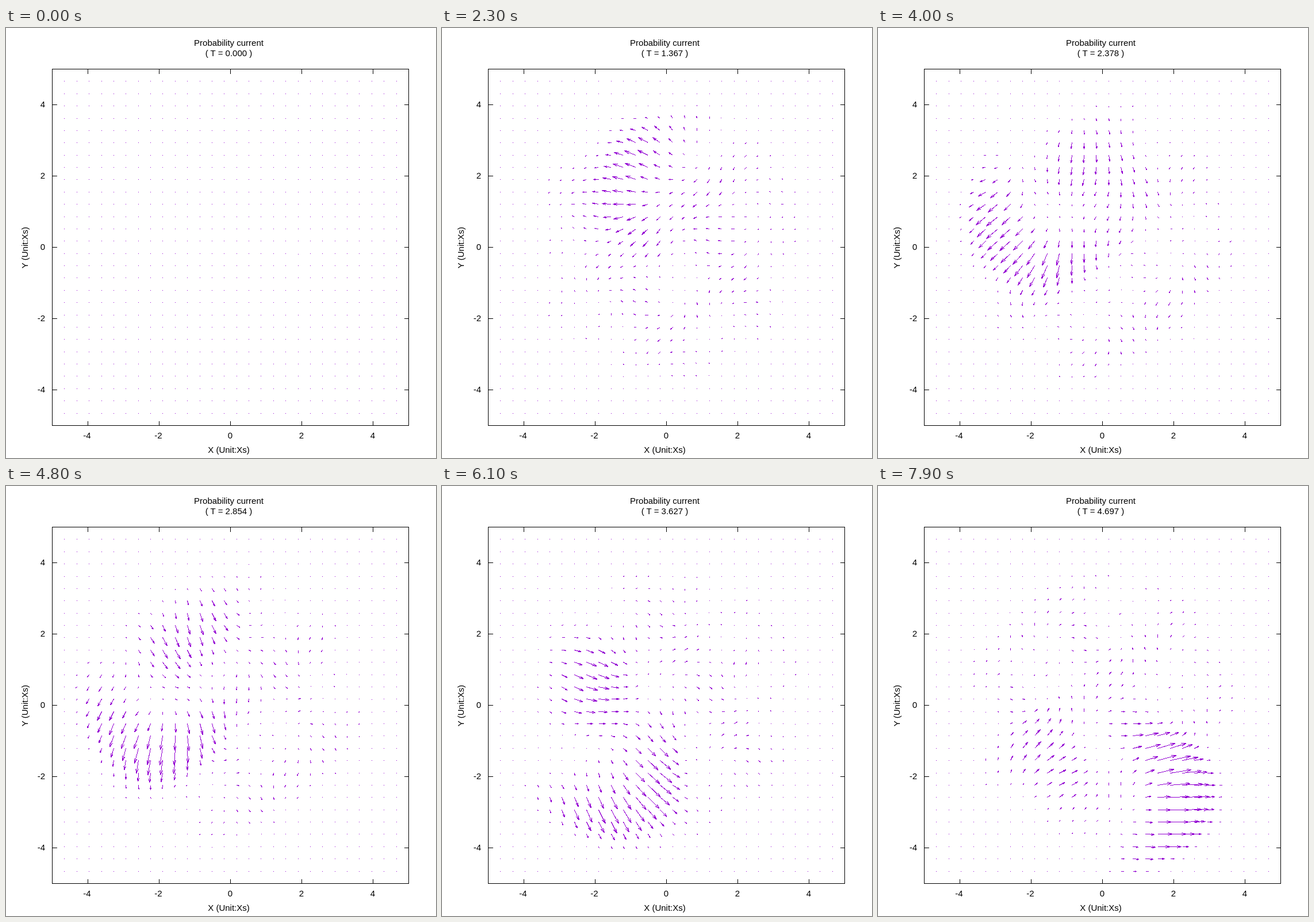
Recreate the animation shown at these times as an HTML page. Size 748 by 748 pixels, loop 8000 ms.

```html
<!DOCTYPE html>
<html lang="en">
<head>
<meta charset="utf-8">
<title>Probability current</title>
<style>
  html, body { margin: 0; width: 100%; height: 100%; overflow: hidden; background: #fff; }
  svg { display: block; width: 748px; height: 748px; }
  text { font: 15px "Liberation Sans", Arial, sans-serif; text-anchor: middle; fill: #000; }
  text.right { text-anchor: end; }
  path { fill: none; stroke-width: 1; shape-rendering: crispEdges; }
  #axes { stroke: #000; }
  #field { stroke: #9400d3; }
</style>
</head>
<body>
<svg id="plot" viewBox="0 0 748 748">
  <path id="field"/>
  <path id="axes"/>
  <text x="387.5" y="31">Probability current</text>
  <text id="clock" x="387.5" y="48.5">( T = 0.000 )</text>
  <text x="387.5" y="739">X (Unit:Xs)</text>
  <text transform="translate(38 382) rotate(-90)">Y (Unit:Xs)</text>
</svg>
<script>
const UNIT = 62, LEFT = 80.5, TOP = 71.5, SIZE = 620;
const STEP_MS = 100, STEPS = 80, DT = 0.0594556;
const CELLS = 29;

const { sin, cos, exp, min, max, hypot, atan2, PI } = Math;
const px = x => LEFT + (x + 5) * UNIT;
const py = y => TOP + (5 - y) * UNIT;
const snap = n => Math.floor(n) + .5;
const el = id => document.getElementById(id);

// A moving cloud: centre in polar form, heading, speed in pixels, spreading
// rate, half-length along and across the heading, and how far its ends lag.
function cloud(radius, angle, heading, speed, spread, along, across, bend) {
  const cx = radius * cos(angle), cy = radius * sin(angle);
  const hx = cos(heading), hy = sin(heading);
  return (x, y) => {
    const dx = x - cx, dy = y - cy;
    const q = dy * hx - dx * hy;
    const p = dx * hx + dy * hy + bend * q * q;
    const w = exp(-((p / along) ** 2) - (q / across) ** 4);
    return [w * (speed * hx + spread * dx), w * (speed * hy + spread * dy)];
  };
}

// Weak interference that spreads from the packet over the whole trap.
function ripple(T) {
  const grow = min(1, T / 1.1), power = max(.35, grow);
  const reach = 1 + 2.8 * grow, cx = 1.5 * (1 - grow);
  const turn = 1.12 * T - 4.4;
  return (x, y) => {
    const w = power * exp(-((hypot(x - cx, y) / reach) ** 6));
    return [
      w * (3 * sin(2 * x + 1.3 * y + 1.4 * T) + 2 * grow * cos(turn)),
      w * (3.4 * cos(1.5 * x - 1.9 * y - 1.1 * T) + 2 * grow * sin(turn))
    ];
  };
}

// The packet circles once per 2 pi while drifting out and gaining speed;
// its wake follows about a quarter turn behind and flows inward.
function flowAt(T) {
  const start = min(1, T / .9);
  const angle = T + .73 * start;
  const packet = cloud(1.6 + .34 * T, angle, angle + .93,
    start * (13 + 4.5 * T), start * 10 * (1 - T / 6), .85, 1.9, .28);
  const lag = angle - 1.48;
  const wake = cloud(2.2, lag, lag + PI,
    16 * max(0, sin(PI * (T - .9) / 5)), 0, 1, 1.3, 0);
  return [ripple(T), packet, wake];
}

function arrow(x, y, u, v) {
  if (hypot(u, v) < 1.2) return `M${x - .5} ${y}h1`;
  const dx = Math.round(u), dy = Math.round(-v), len = hypot(dx, dy);
  let d = `M${x} ${y}l${dx} ${dy}`;
  if (len < 2.5) return d;
  const head = min(9, len * .42), angle = atan2(dy, dx);
  for (const a of [angle - .26, angle + .26])
    d += `M${x + dx} ${y + dy}l${(-head * cos(a)).toFixed(1)} ${(-head * sin(a)).toFixed(1)}`;
  return d;
}

function draw(step) {
  const T = step * DT, parts = flowAt(T);
  let d = "";
  for (let row = 1; row < CELLS; row++) {
    for (let col = 1; col < CELLS; col++) {
      const x = col * 10 / CELLS - 5, y = 5 - row * 10 / CELLS;
      let u = 0, v = 0;
      for (const part of parts) {
        const [du, dv] = part(x, y);
        u += du;
        v += dv;
      }
      d += arrow(snap(px(x)), snap(py(y)), u, v);
    }
  }
  el("field").setAttribute("d", d);
  el("clock").textContent = `( T = ${T.toFixed(3)} )`;
}

function label(x, y, value, cls) {
  const t = document.createElementNS("http://www.w3.org/2000/svg", "text");
  t.setAttribute("x", x);
  t.setAttribute("y", y);
  if (cls) t.setAttribute("class", cls);
  t.textContent = value;
  el("plot").append(t);
}

function drawAxes() {
  const right = LEFT + SIZE, bottom = TOP + SIZE;
  let d = `M${LEFT} ${TOP}h${SIZE}v${SIZE}h${-SIZE}z`;
  for (let n = -4; n <= 4; n += 2) {
    const x = px(n), y = py(n);
    d += `M${x} ${TOP}v8M${x} ${bottom}v-8M${LEFT} ${y}h8M${right} ${y}h-8`;
    label(x - (n < 0 ? 1.5 : .5), 713.5, n);
    label(68, y + 4.5, n, "right");
  }
  el("axes").setAttribute("d", d);
}

let shown = -1;
function tick() {
  const step = Math.floor(performance.now() / STEP_MS) % STEPS;
  if (step !== shown) draw(shown = step);
  requestAnimationFrame(tick);
}

drawAxes();
tick();
</script>
</body>
</html>
```
